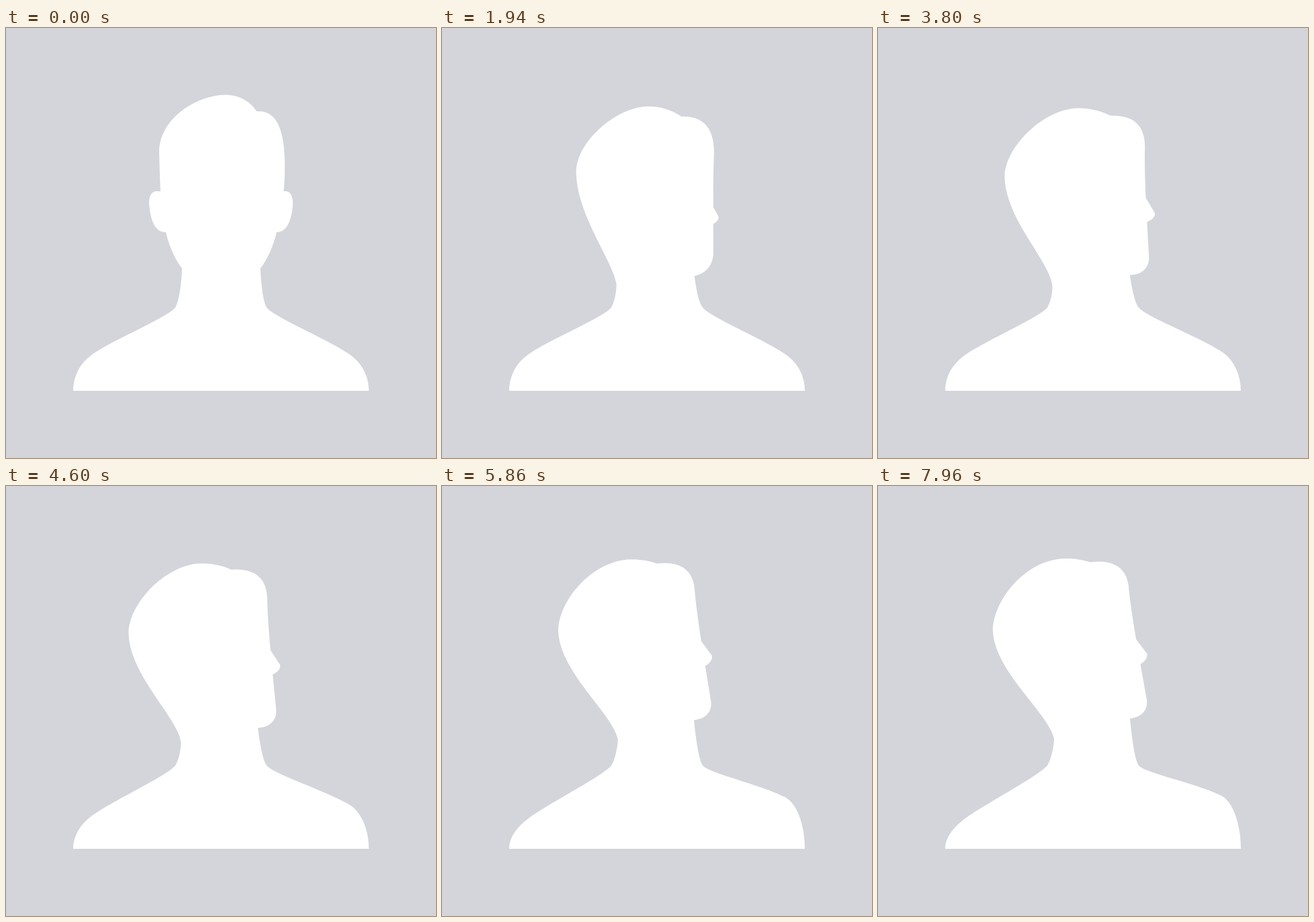
Recreate the animation shown at these times as an HTML page. Size 640 px wide and 640 px high, loop 8000 ms.

```html
<!DOCTYPE html>
<html lang="en">
<head>
<meta charset="utf-8">
<title>Turning silhouette</title>
<style>
  html, body { margin: 0; width: 100%; height: 100%; overflow: hidden; background: #d4d5da; }
  svg { display: block; width: 100%; height: 100%; fill: #fff; }
  path { animation: 8s linear infinite; }
  .figure { animation-name: figure; }
  .nose { animation-name: nose; }
  .ear-l { animation-name: ear-l; }
  .ear-r { animation-name: ear-r; }

  /* Poses: facing front, turned aside, then chin and shoulder raised */
  @keyframes figure {
    0% {
      animation-timing-function: cubic-bezier(.37, 0, .63, 1);
      d: path("M100 540 C100 520 109 500 127 487 C155 466 242 430 252 416 C257 407 261 385 262 358 C228 312 230 245 228 185 C228 133 286 100 326 99.5 C348 99.5 364 110 373 124 C400 122 415 145 415 205 C415 240 411 272 403 303 C398 324 390 343 378.5 358 C380 385 383 408 388 416 C398 430 485 466 513 487 C531 500 540 520 540 540 Z");
    }
    35%, 37.5% {
      animation-timing-function: cubic-bezier(.333, .1, .667, .9);
      d: path("M100 540 C100 520 109 500 127 487 C155 466 242 430 252 416 C256 409 259 399 259 388 C260 352 192.5 288 192 222 C192 180 252 121.5 302 121.5 C320 121.5 337 126 352 134 C384 133 404 148 402 185 C400 225 402 290 404 346 C404 362 393 372 375 372 C377 385 381 407 388 416 C398 430 485 466 513 487 C531 500 540 520 540 540 Z");
    }
    80.25%, 100% {
      d: path("M100 540 C100 526 108 512 127 497 C154 476 239 432 252 416 C257 409 262 388 262 376 C254 338 173 276 171 215 C171 171 220 108 280 108 C293 108 306 110 316 113.5 C350 109 372 121 373.5 155 C377 190 391 268 400 318 C402 334 392 344 375 346 C378 375 382 407 388 416 C396 427 480 444 513 462 C531 474 540 508 540 540 Z");
    }
  }
  @keyframes nose {
    0% {
      animation-timing-function: cubic-bezier(.37, 0, .63, 1);
      d: path("M388 257 L401 280 C403 285 397 291 389 293.5 L372 275 Z");
    }
    35%, 37.5% {
      animation-timing-function: cubic-bezier(.333, .1, .667, .9);
      d: path("M401 257 L414 280 C416 285 410 291 402 293.5 L385 275 Z");
    }
    80.25%, 100% {
      d: path("M384 228 L400 249 C402 254 398 261 390.5 265 L372 250 Z");
    }
  }
  @keyframes ear-l {
    0% { transform: none; animation-timing-function: cubic-bezier(.37, 0, .63, 1); }
    35%, 100% { transform: translate(41px, 20px); }
  }
  @keyframes ear-r {
    0% { transform: none; animation-timing-function: cubic-bezier(.37, 0, .63, 1); }
    35%, 100% { transform: translate(-70px, 20px); }
  }
</style>
</head>
<body>
<svg viewBox="0 0 640 640">
  <path class="figure"/>
  <path class="nose"/>
  <path class="ear-l" d="M240 243.5 L225 243 C215 242.5 212 253 213.3 266 C216 288 222 304 238 304 Z"/>
  <path class="ear-r" d="M400 243.5 L415 243 C425 242.5 428 253 426.7 266 C424 288 418 304 402 304 Z"/>
</svg>
</body>
</html>
```
